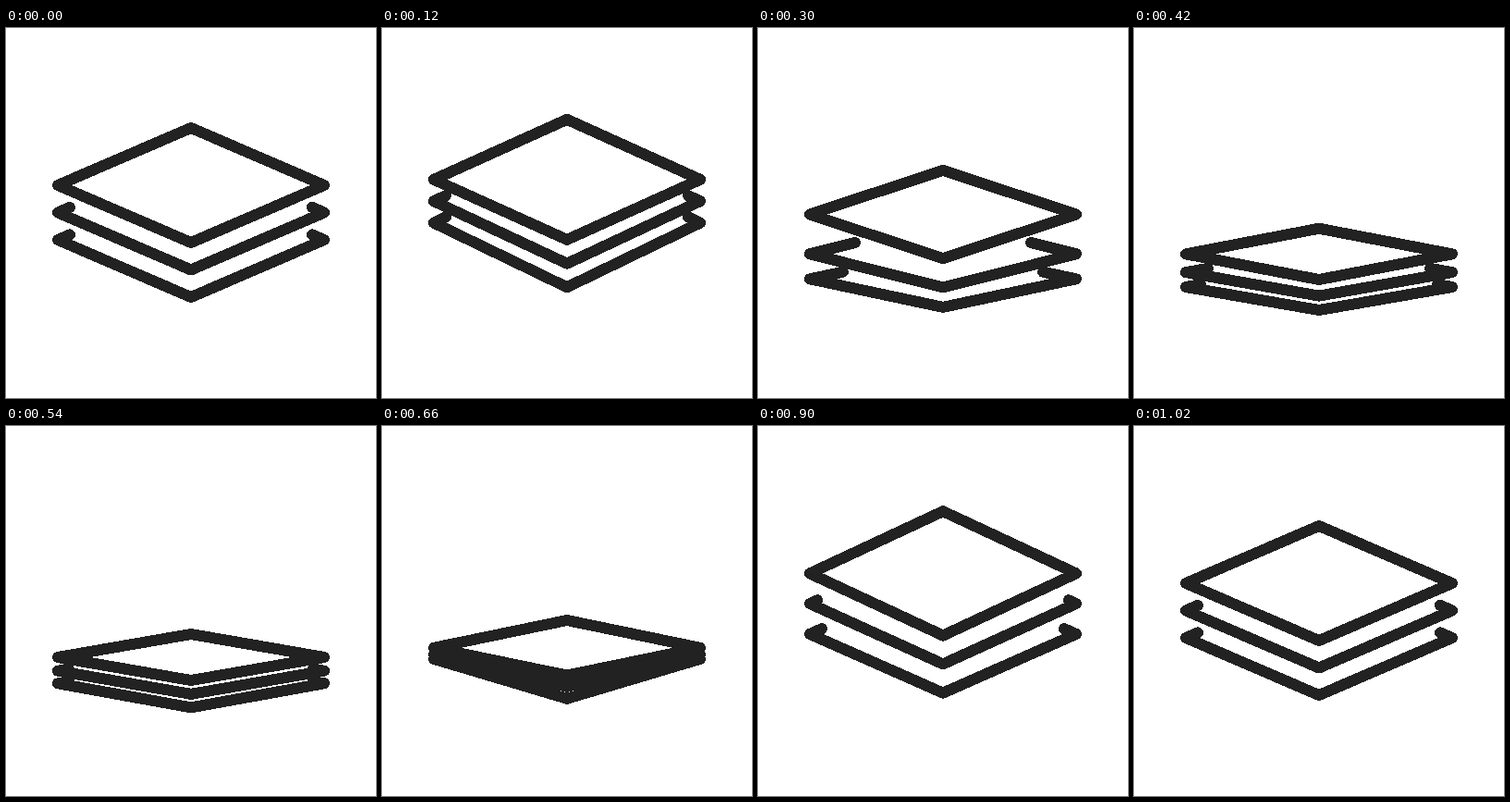
These frames come from a looping animation (400 px wide and 400 px high, 1.05 s). An HTML page:

```html
<!DOCTYPE html>
<html lang="en">
<head>
<meta charset="utf-8">
<title>Layers</title>
<style>
  html, body { margin: 0; width: 100%; height: 100%; overflow: hidden; background: #fff; }
  svg { display: block; width: 100%; height: 100%; }
  path {
    fill: none; stroke: #232223; stroke-width: 12;
    stroke-linecap: round; stroke-linejoin: round; shape-rendering: crispEdges;
  }
</style>
</head>
<body>
<svg viewBox="0 0 400 400"><path/><path/><path/></svg>
<script>
const STEP = 30, STEPS = 35;
const LEFT = 56, MID = 200, RIGHT = 344, HALF = MID - LEFT;
const paths = document.querySelectorAll('path');

const smooth = s => s * s * (3 - 2 * s);

// Bezier ease (1/3, 0, 0.1, 1): quick start, long settle.
function settle(x) {
  let lo = 0, hi = 1;
  for (let n = 0; n < 24; n++) {
    const s = (lo + hi) / 2;
    if (s - 1.7 * s * s + 1.7 * s ** 3 < x) lo = s; else hi = s;
  }
  return smooth(lo);
}
const launch = x => 1 - settle(1 - x);

// Each key is [step, value, ease towards it].
function track(keys, k) {
  if (k <= keys[0][0]) return keys[0][1];
  for (let n = 1; n < keys.length; n++) {
    const [start, from] = keys[n - 1];
    const [end, to, ease = smooth] = keys[n];
    if (k <= end) return from + (to - from) * ease((k - start) / (end - start));
  }
  return keys[keys.length - 1][1];
}

// Lower layers lead the top one by a step or so each.
const poses = (i, rest, high, low) => [
  [2 - i, rest],
  [7 - i, high],
  [[17.4, 15.4, 14][i], low, settle],
  [18.4 - 1.2 * i, low],
  [27 - i, high, launch],
  [34 - i, rest]
];

// Horizontal reach of the visible ends of the back edges.
const stubs = [
  null,
  [[0, 13], [4, 13], [10, 49], [14, 24], [18, 12], [22, 12], [25, 5], [27, 5], [34, 13]],
  [[0, 13], [4, 13], [10, 36], [14, 16], [18, 12], [22, 12], [27, 13]]
];

const layers = [0, 1, 2].map(i => ({
  y: poses(i, 170 + 29.5 * i, 152.5 + 28 * i, 250 + 15 * i),
  h: poses(i, 62, 70.5, 25),
  stub: stubs[i]
}));

function draw(k) {
  layers.forEach((layer, i) => {
    const y = track(layer.y, k), h = track(layer.h, k);
    const front = `${LEFT} ${y}L${MID} ${y + h}L${RIGHT} ${y}L`;
    if (!layer.stub) {
      paths[i].setAttribute('d', `M${front}${MID} ${y - h}Z`);
      return;
    }
    const dx = track(layer.stub, k), top = y - h * dx / HALF;
    paths[i].setAttribute('d', `M${LEFT + dx} ${top}L${front}${RIGHT - dx} ${top}`);
  });
}

const origin = performance.now();
function tick() {
  draw(Math.floor((performance.now() - origin) / STEP) % STEPS);
  requestAnimationFrame(tick);
}
tick();
</script>
</body>
</html>
```
